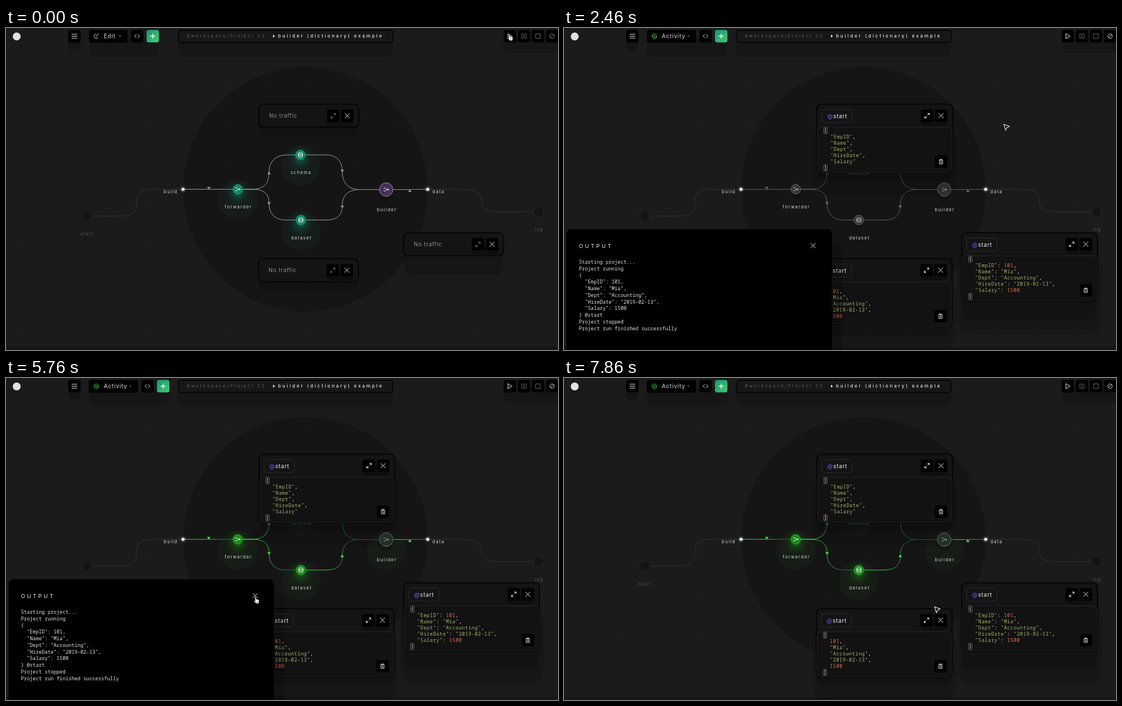
Write an HTML page that moves like this. It is 980 by 571 pixels and loops after 8 s.

```html
<!DOCTYPE html>
<html lang="en">
<head>
<meta charset="utf-8">
<title>Flow builder</title>
<style>
html, body { margin: 0; width: 100%; height: 100%; overflow: hidden; background: #1b1b1b; }
svg { display: block; width: 980px; height: 571px; }
text { font-family: Inter, "Open Sans", sans-serif; white-space: pre; }
.label { font-size: 7.6px; letter-spacing: 1.5px; fill: #d6d6d6; }
.quiet { fill: #555; }
.ui { font-size: 10.2px; letter-spacing: .75px; fill: #ddd; }
.crumb { font-size: 8px; letter-spacing: 2.45px; fill: #5c5c5c; }
.here { letter-spacing: 2.85px; font-weight: 500; fill: #e6e6e6; }
.code { font: 8.3px "Noto Sans Mono", "DejaVu Sans Mono", monospace; letter-spacing: .7px; fill: #f4f4f4; }
.log { font: 8.8px "Noto Sans Mono", "DejaVu Sans Mono", monospace; fill: #e4e4e4; }
.line { fill: none; stroke-linecap: round; stroke-linejoin: round; }
</style>
</head>
<body>
<svg id="stage" viewBox="0 0 980 571"></svg>
<script>
const stage = document.getElementById('stage');

// start ms, look, cursor, tip x, tip y
const steps = [
  [0, 'edit', 'hand', 890.5, 10.5],
  [210, 'edit', 'hand', 891.5, 11.5],
  [1410, 'run', 'hand', 891.5, 11.5],
  [2010, 'run', 'arrow', 880, 18],
  [2160, 'run', 'arrow', 780, 170],
  [2460, 'data', 'arrow', 780, 170],
  [3660, 'lift', 'arrow', 780, 170],
  [3810, 'done', 'arrow', 780, 170],
  [5010, 'done', 'arrow', 773, 173],
  [5160, 'done', 'arrow', 541, 330],
  [5310, 'done', 'arrow', 481, 389],
  [5460, 'done', 'arrow', 466, 390],
  [5610, 'done', 'arrow', 440, 390],
  [5760, 'done', 'hand', 440, 388],
  [6060, 'done', 'arrow', 442, 388],
  [7560, 'done', 'arrow', 484, 385],
  [7710, 'done', 'arrow', 635, 405],
  [7860, 'done', 'arrow', 657, 405]
];
const LOOP = 8000, OPEN = 1410, CLOSE = 6060;

const fields = ['EmpID', 'Name', 'Dept', 'HireDate', 'Salary'];
const values = ['101', '"Mia"', '"Accounting"', '"2019-02-13"', '1500'];
const comma = i => i < 4 ? ',' : '';
const record = ['{', ...fields.map((f, i) => `  "${f}": ${values[i]}${comma(i)}`), '}'];
const panels = [
  { x: 449, y: 135, drop: 15, code: ['[', ...fields.map((f, i) => `  "${f}"${comma(i)}`), ']'] },
  { x: 448, y: 409, drop: 15, code: ['[', ...values.map((v, i) => '  ' + v + comma(i)), ']'] },
  { x: 706, y: 363, drop: 34, code: record }
];

const rect = (x, y, w, h, r, fill, extra = '') =>
  `<rect x="${x}" y="${y}" width="${w}" height="${h}" rx="${r}" fill="${fill}" ${extra}/>`;
const disc = (x, y, r, fill, extra = '') => `<circle cx="${x}" cy="${y}" r="${r}" fill="${fill}" ${extra}/>`;
const line = (d, stroke, w = 1, extra = '') =>
  `<path class="line" d="${d}" stroke="${stroke}" stroke-width="${w}" ${extra}/>`;
const text = (x, y, s, cls, extra = '') => `<text x="${x}" y="${y}" class="${cls}" ${extra}>${s}</text>`;
const mid = (x, y, s, cls = 'label') => text(x + .7, y, s, cls, 'text-anchor="middle"');
const at = (x, y, s) => `<g transform="translate(${x} ${y})">${s}</g>`;
const shade = (x, y, w, h, o = .19, r = 11) => rect(x, y, w, h, r, '#000', `opacity="${o}"`);

const icons = {
  menu: 'M-4.5-3.5H4.5M-4.5 0H4.5M-4.5 3.5H4.5',
  code: 'M-1.5-2.8L-4.3 0L-1.5 2.8M1.5-2.8L4.3 0L1.5 2.8',
  plus: 'M-4 0H4M0-4V4',
  close: 'M-4-4L4 4M4-4L-4 4',
  expand: 'M1-1L4-4M1.2-4H4V-1.2M-1 1L-4 4M-1.2 4H-4V1.2',
  play: 'M-3-4.3L4 0L-3 4.3Z',
  pause: 'M-4-4H-1.3V4H-4ZM1.3-4H4V4H1.3Z',
  stop: 'M-4-4H4V4H-4Z',
  ban: 'M-4 0A4 4 0 1 1 4 0A4 4 0 1 1-4 0M-2.7 2.7L2.7-2.7',
  clip: 'M-2.7-3H2.7V4H-2.7ZM-1.2-4H1.2V-2.4H-1.2ZM-1 0H1M-1 1.8H1',
  edit: 'M2.7 2.7A4 4 0 1 1-1-4M-.5 1L0-1L4-4.5',
  pulse: 'M-4 .5A4 4 0 0 1 3.5-2M4-.5A4 4 0 0 1-3.5 2M-4 .5H-1.6L0-1.5L1 1L2 0H4',
  fork: 'M-4-2.5H-2.5C0-2.5-.5 0 2 0H4.3M-4 2.5H-2.5C0 2.5-.5 0 2 0M2.8-1.5L4.3 0L2.8 1.5',
  store: 'M-3.8-2.5A3.8 1.6 0 0 1 3.8-2.5A3.8 1.6 0 0 1-3.8-2.5V2.6A3.8 1.6 0 0 0 3.8 2.6V-2.5M-3.8 0A3.8 1.6 0 0 0 3.8 0'
};
const icon = (name, x, y, color = '#eee', w = 1) => at(x, y, line(icons[name], color, w));
const button = (name, x, y, color) => rect(x - 11, y - 11, 22, 22, 4, '#000') + icon(name, x, y, color);

const stops = (...list) => list.map(([o, c, a = 1]) => `<stop offset="${o}" stop-color="${c}" stop-opacity="${a}"/>`).join('');
const ramp = (id, x1, x2) => `<linearGradient id="${id}" gradientUnits="userSpaceOnUse" x1="${x1}" x2="${x2}" y1="0" y2="0">`
  + stops([0, '#43dd43'], [.45, '#3cc848'], [.75, '#22665c'], [1, '#205a55']) + '</linearGradient>';
const glow = (id, c) => `<radialGradient id="${id}">${stops([0, c, .6], [.35, c, .28], [.7, c, .08], [1, c, 0])}</radialGradient>`;
const defs = '<defs>' + ramp('inFlow', 314, 411) + ramp('split', 411, 523) + ramp('join', 505, 650) + ramp('outFlow', 640, 790)
  + glow('teal', '#0c9a78') + glow('lime', '#16a016') + glow('white', '#fff')
  + '<linearGradient id="add" x2="1" y2="1">' + stops([0, '#1d9474'], [1, '#3bcf70']) + '</linearGradient></defs>';

const flows = [
  ['M314 286H411', 'inFlow'],
  ['M411 286H437C457 286 467 276 467 256C467 238 477 225 500 225H523', 'split'],
  ['M411 286H437C457 286 467 293 467 311C467 330 478 340.5 497 340.5H523', 'split'],
  ['M523 225H568C589 225 597 238 597 255C597 275 608 286.5 628 286.5H675', 'join'],
  ['M523 340.5H568C590 340.5 597 330 597 315C597 297 607 286.5 628 286.5H675', 'join'],
  ['M675 286.5H715Q719 286 749 286', 'outFlow']
];
const heads = [[360, 284, 1], [467, 257, -1], [467, 311, 1], [597, 253.5, 1], [597, 315.5, -1], [717, 288.5, -1]];
const nodes = [
  [411.5, 286, 8.5, 'fork', 'forwarder', 320],
  [522.7, 225, 8.5, 'store', 'schema', 259],
  [523.5, 340.5, 8.5, 'store', 'dataset', 374.5],
  [675, 286.5, 12, 'fork', 'builder', 324.5]
];

function backdrop() {
  let s = rect(0, 0, 980, 571, 0, '#1b1b1b') + disc(531.7, 286, 217, '#151515');
  for (let i = 0; i < 13; i++)
    for (let j = 0; j < 7; j++) s += disc(26.3 + i * 73.6, 94 + j * 73.5, .7, '#303030');
  return s + rect(0, 566, 980, 5, 0, '#151515');
}

function topBar(look) {
  const edit = look === 'edit', shift = edit ? 0 : 18.5, running = look === 'run';
  let s = shade(110, 18, 22, 23) + shade(147, 18, 125 + shift, 33) + shade(305, 18, 382, 33) + shade(883, 18, 110, 27);
  s += disc(19, 15, 7, '#e2e2e2') + button('menu', 121.5, 14.5);
  s += rect(147, 3.5, 69 + shift, 22.5, 4, '#000');
  s += icon(edit ? 'edit' : 'pulse', 160.5, 14.7, edit ? '#ddd' : '#3fdc4a');
  s += text(173.5, 18.3, edit ? 'Edit' : 'Activity', 'ui');
  s += at(202.5 + shift, 14.5, '<path d="M-2-1H2L0 1.3Z" fill="#777"/>');
  s += button('code', 232.7 + shift, 14.5);
  s += rect(249.5 + shift, 3.5, 22, 22, 4, 'url(#add)') + icon('plus', 260.5 + shift, 14.5, '#fff', 1.3);
  s += rect(306, 4, 381, 21.5, 4, '#171717', 'stroke="#000" stroke-width="1.4"');
  s += text(321, 17.2, '#workspace/Project 23', 'crumb');
  s += '<path d="M474 11.8L477.5 14.4L474 17Z" fill="#eee"/>';
  s += text(483, 17.2, 'builder (dictionary) example', 'crumb here');
  s += button(running ? 'ban' : 'play', 894.5, 14.5, running ? '#777' : '#eee') + button('pause', 919.5, 14.5, '#555');
  s += button('stop', 944.5, 14.5, running ? '#eee' : '#666');
  return s + button('ban', 969.5, 14.5, edit ? '#777' : '#ccc');
}

function node([x, y, r, name, label, ly], look) {
  const big = r > 10, edit = look === 'edit', done = look === 'done';
  const hue = done ? 'lime' : edit && !big ? 'teal' : '';
  let s = '';
  if (hue) {
    s += disc(x, y + 19, 35, hue === 'lime' ? '#2a8a2a' : '#128a70', 'opacity=".06"');
    if (!big) s += disc(x, y + 8, 26, `url(#${hue})`, 'opacity=".5"') + disc(x, y + 3, 17, `url(#${hue})`, 'opacity=".8"');
  }
  if (!edit && !done || big) s += disc(x, y + 8, r, '#000', 'opacity=".2"');
  if (look === 'lift') {
    s += icon(name, x, y, '#eee');
    s += disc(x, big ? 275 : y - 26.7, big ? 12 : 6, '#414141', `opacity="${big ? .85 : 1}" stroke="#555" stroke-width=".6"`);
  } else {
    const fill = edit ? (big ? '#46305a' : '#158464') : done ? (big ? '#29382f' : '#1b8a1e') : '#353535';
    const rim = edit ? (big ? '#9a8fa2' : '#279e7c') : done ? (big ? '#6d7a72' : '#2caa2f') : '#686868';
    s += disc(x, y, r, fill, `stroke="${rim}"`) + icon(name, x, y, edit || done && !big ? '#f4f4f4' : '#bbb');
  }
  return s + mid(x + .5, ly, label);
}

function graph(look) {
  const lit = look === 'lift' || look === 'done', edit = look === 'edit';
  let s = line('M152 333.5H205C225 333.5 232 325 232 310C232 295 238 286 258 286H314'
    + 'M749 286H812C838 286 844 295 844 306C844 318 850 325.5 870 325.5H936', '#434343', .9, 'stroke-dasharray="2 2"');
  for (const [x, y, name, ly] of [[143.5, 333.5, 'start', 368], [945.5, 325.5, 'log', 360]])
    s += disc(x, y, 9, '#141414', 'stroke="#383838" stroke-dasharray="2 2"') + mid(x, ly, name, 'label quiet');
  flows.forEach(([d, id], i) => {
    s += line(d, lit ? `url(#${id})` : edit ? (i > 4 ? '#a78ba6' : '#a2a2a2') : '#626262', 1);
  });
  if (edit) s += line('M622 286.5H675', '#a78ba6', 1.1);
  for (const [x, y, dir] of heads)
    s += at(x, y, `<path d="M-3.2 ${-2.3 * dir}H3.2L0 ${2.7 * dir}Z" fill="${lit ? '#3fe03f' : edit ? '#909090' : '#666'}"/>`);
  for (const n of nodes) s += node(n, look);
  for (const x of [314.3, 748.7]) s += disc(x, 286, 7, 'url(#white)') + disc(x, 286, 2.6, '#fff');
  return s + text(280, 293, 'build', 'label') + text(757, 293, 'data', 'label');
}

function tint(s) {
  return s.replace(/"[^"]*"|\d+/g, m => `<tspan fill="${m[0] === '"' ? '#a9b46c' : '#ee6f4c'}">${m}</tspan>`);
}

function panel({ x, y, drop, code }, open) {
  const w = open ? 241 : 177.5, h = open ? 122 : 41, b = open ? 195.5 : 132;
  let s = shade(x + 1, y + 22, w - 2, h - 22 + drop, .2);
  if (open) s += shade(x - 7, y + 40, w + 15, h - 15 + drop, .14, 26);
  s += rect(x, y, w, h, 8, '#141414', 'stroke="#000" stroke-width="1.5"');
  s += shade(x + b - 12, y + 22, 50, 17, .3);
  s += button('expand', x + b, y + 20.5, open ? '#eee' : '#777') + button('close', x + b + 25, y + 20.5);
  if (!open) return s + text(x + 18, y + 23.8, 'No traffic', 'ui', 'style="fill:#909090;font-size:9.7px"');
  s += rect(x + 9, y + 9.5, 53.5, 23, 4, 'none', 'stroke="#2b2b2b"');
  s += text(x + 18.5, y + 24.5, '<tspan fill="#7d5cf0">@</tspan>start', 'ui', 'style="fill:#eee;font-size:10px"');
  s += rect(x + 1, y + 41, w - 2, h - 42, 7, '#121212', 'stroke="#2b2b2b" stroke-width=".8"');
  for (const dy of [41.5, 107.5]) s += rect(x + 12.3, y + dy, 6, 11, 1, 'none', 'stroke="#888" stroke-width=".7"');
  code.forEach((c, i) => { s += text(x + 12.7, y + 50 + i * 11, tint(c), 'code'); });
  return s + button('clip', x + 220.5, y + 102, '#ddd');
}

function output(look) {
  const lines = ['Starting project...', 'Project running'];
  if (look !== 'run') lines.push(...record.slice(0, 6), '} @start', 'Project stopped', 'Project run finished successfully');
  let s = shade(20, 380, 474, 200, .2) + rect(4.5, 357, 471, 224, 8, '#000');
  s += text(26.5, 390, 'OUTPUT', 'ui', 'style="font-size:9.6px;letter-spacing:3.4px;fill:#eee"') + icon('close', 442.5, 386);
  lines.forEach((l, i) => { s += text(26.5, 418 + i * 11.78, l, 'log'); });
  return s;
}

const cursors = {
  arrow: '<path d="M.7.7L11 4.6L6.3 6.5L4.2 11.4Z" fill="#111" stroke="#f4f4f4" stroke-width="1.1" stroke-linejoin="round"/>',
  hand: '<path d="M1.6 1.4C1.4 0 3.5-.3 3.8 1.2L4.4 4.1C5.3 3.8 5.9 4.1 6.2 4.7C7 4.4 7.6 4.7 7.9 5.3C8.8 5.1 9.3 5.7 9.4 6.6C9.7 8.6 9.2 10 8.4 11.9H4C3 10.2 1.5 9.3.4 7.7C-.1 6.7 1 6.1 1.8 6.8L2.6 7.4Z" fill="#fff" stroke="#000" stroke-width=".7"/><path d="M4.8 8V10M6.2 7.9V9.9M7.6 7.8V9.8" stroke="#444" stroke-width=".5"/>'
};

function draw([t, look, cursor, x, y]) {
  const open = look !== 'edit' && look !== 'run';
  stage.innerHTML = defs + backdrop() + graph(look)
    + panels.map(p => panel(p, open)).join('') + topBar(look)
    + (t >= OPEN && t < CLOSE ? output(look) : '') + at(x, y, cursors[cursor]);
}

let shown;
function tick() {
  const t = performance.now() % LOOP;
  const step = steps.findLast(s => s[0] <= t);
  if (step !== shown) draw(shown = step);
  requestAnimationFrame(tick);
}
tick();
</script>
</body>
</html>
```
